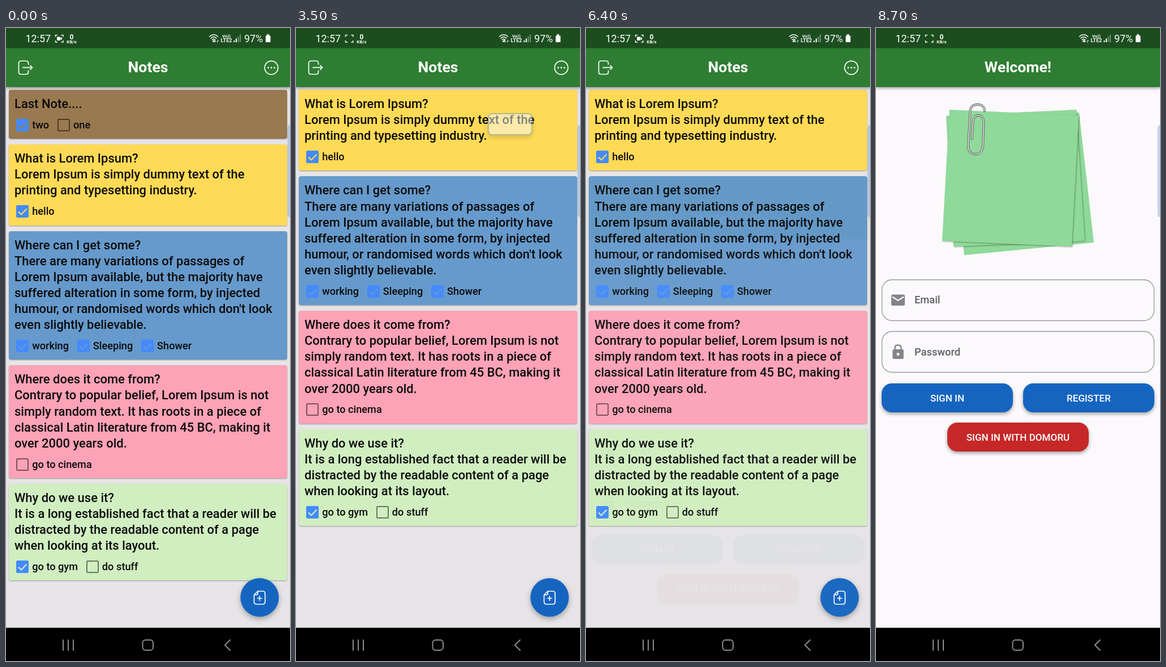
An HTML page for the animation above (8.9 s loop, 502 by 1115 pixels).

```html
<!DOCTYPE html>
<html lang="en">
<head>
<meta charset="utf-8">
<title>Notes app</title>
<style>
  html, body { margin: 0; width: 100%; height: 100%; overflow: hidden; background: #000; }
  #stage { position: relative; width: 502px; height: 1115px; overflow: hidden; }
  #stage, svg text { font-family: Roboto, Arial, sans-serif; font-weight: 500; }
  .page, svg.full { position: absolute; left: 0; top: 0; width: 502px; height: 1115px; }
  .bar {
    position: absolute; left: 0; top: 0; width: 502px; height: 104px; background: #2e7d32;
    box-shadow: 0 2px 5px rgba(0,0,0,.4); color: #fff; text-align: center;
    font-size: 26.7px; font-weight: 700; line-height: 138px;
  }
  #notes { background: #e6e4e6; }
  #login { background: #fbf9fb; }
  #list { position: absolute; left: 5px; top: 109px; width: 492px; }
  .card {
    box-sizing: border-box; margin-bottom: 10.05px; padding: 11px 0 13.3px 10px;
    border-radius: 4px; background: var(--c); color: #0b0b0b;
    font-size: 21.96px; line-height: 28.1px; white-space: nowrap;
    box-shadow: 0 1px 2px rgba(0,0,0,.35);
  }
  .card.held { border-radius: 8px; box-shadow: inset 0 0 0 1.5px #111, 0 1px 2px rgba(0,0,0,.35); }
  .chips { display: flex; height: 22px; margin: 11.8px 0 0 3px; font-size: 18.2px; line-height: 22px; }
  .chips span { margin: 0 14.6px 0 6.2px; }
  .chips i { box-sizing: border-box; width: 22px; height: 22px; border: 2px solid rgba(0,0,0,.5); border-radius: 2.5px; }
  .chips i.on { border: 0; background: #448aff; }
  .chips svg { display: block; fill: none; stroke: var(--c); stroke-width: 2.2; }
  #menu {
    position: absolute; right: 84.5px; top: 149.5px; box-sizing: border-box; overflow: hidden;
    background: #fdfcfd; border: 2px solid #5b9fdb; border-radius: 8px;
    box-shadow: 0 4px 8px rgba(0,0,0,.3);
  }
  #menu div { position: absolute; right: 0; width: 132px; height: 58.6px; overflow: hidden; }
  #menu span { position: absolute; left: 17px; font-size: 18.3px; line-height: 58.6px; color: #0b0b0b; white-space: nowrap; }
  #menu i { position: absolute; border-radius: 50%; background: rgba(185,182,186,.4); }
  .line { fill: none; stroke: #fff; stroke-width: 1.7; stroke-linecap: round; stroke-linejoin: round; }
  .line.thin { stroke-width: 1.5; }
  .line.nav { stroke: #8c8c8c; stroke-width: 2; }
  .regular text { font-weight: 400; }
  .bold text { font-weight: 700; }
  .sheet { filter: drop-shadow(1px 1px 1px rgba(0,0,0,.35)); }
</style>
</head>
<body>
<div id="stage">
  <div class="page" id="notes">
    <div id="list"></div>
    <div class="bar">Notes</div>
    <svg class="full">
      <g class="line">
        <path d="M39.500 64V62Q39.500 58 35.500 58H26.500Q22.500 58 22.500 62V77.500Q22.500 81.500 26.500 81.500H35.500Q39.500 81.500 39.500 77.500V75M30 69.700H46.500M43 66.200L46.500 69.700L43 73.200"/>
        <circle cx="469" cy="70" r="11.800"/>
      </g>
      <path d="M463.500 70h.01M469 70h.01M474.500 70h.01" stroke="#fff" stroke-width="2.900" stroke-linecap="round"/>
      <circle cx="448.300" cy="1003" r="34" fill="#1565c0" style="filter:drop-shadow(0 4px 5px rgba(0,0,0,.3))"/>
      <path class="line" d="M438.500 998.500L445 992H453.500Q458 992 458 996.500V1010.500Q458 1015 453.500 1015H443Q438.500 1015 438.500 1010.500ZM438.500 998.500H442.500Q445 998.500 445 996V992M448.300 1000.800V1008.200M444.600 1004.500H452"/>
      <g id="press" fill="#fff">
        <circle cx="34.500" cy="69" r="42.500" opacity=".2"/>
        <circle id="splash" opacity=".27"/>
      </g>
    </svg>
  </div>

  <div id="menu">
    <div style="top:8px"><span>Open note</span></div>
    <div style="top:66px"><i></i><span>Delete note</span></div>
  </div>

  <div class="page" id="login">
    <div class="bar">Welcome!</div>
    <svg class="full">
      <defs>
        <path id="clip" d="M192 146C192 131 167 131 166.500 146L163 207C162 227 188 227 189 209L190.500 167C191 150 172 150 171.500 165L169.500 195"/>
      </defs>
      <g id="paper" fill="#8fd99a">
        <path d="M132 173L359 149L385 378L156 400Z"/>
        <path class="sheet" d="M124 155L354 144L369 375L137 385Z"/>
        <path class="sheet" d="M130 144L358.500 154L346 385L117 375Z"/>
        <g fill="none" stroke-linecap="round">
          <use href="#clip" stroke="#5c615c" stroke-width="3.800"/>
          <use href="#clip" stroke="#e4e6e4" stroke-width="1.700"/>
        </g>
      </g>
      <g fill="none" stroke="#98969a" stroke-width="1.300">
        <rect x="10.500" y="443.500" width="481" height="72" rx="18"/>
        <rect x="10.500" y="534.500" width="481" height="72" rx="18"/>
      </g>
      <rect x="27" y="469.500" width="24" height="19.500" rx="2.500" fill="#858387"/>
      <path d="M29 473.500L39 480L49 473.500" fill="none" stroke="#fbf9fb" stroke-width="2.300"/>
      <rect x="29.300" y="566" width="19.500" height="17" rx="2.500" fill="#858387"/>
      <path d="M33.500 567V563.500Q33.500 558.500 39 558.500T44.500 563.500V567" fill="none" stroke="#858387" stroke-width="2.400"/>
      <circle cx="39" cy="574.500" r="2.500" fill="#fbf9fb"/>
      <g font-size="18.300" fill="#626064">
        <text x="68" y="485.300">Email</text>
        <text x="68" y="576.700">Password</text>
      </g>
      <g id="buttons" font-size="17.100" text-anchor="middle"></g>
    </svg>
  </div>

  <svg class="full">
    <rect width="502" height="35.500" fill="#000" opacity=".39"/>
    <g fill="#fff">
      <g class="regular" font-size="17.900">
        <text x="34.500" y="25">12:57</text>
        <text x="421" y="25">97%</text>
      </g>
      <g class="bold" text-anchor="middle">
        <text x="116" y="19.500" font-size="12">0</text>
        <text x="116" y="27" font-size="8">KB/s</text>
        <text x="389.500" y="16.800" font-size="8">Vo))</text>
        <text x="389.500" y="25" font-size="9">LTE2</text>
      </g>
      <path d="M459 13.500h2V11h4v2.500h2.500V25h-8.500z"/>
      <path d="M402.500 22h2v3h-2zM406 18.500h2V25h-2z"/>
      <path d="M409.500 15h2v10h-2zM413 11.500h2V25h-2z" opacity=".4"/>
      <path d="M369 26v-6l-2 2.500h4zM374 20v6l-2-2.500h4z"/>
      <circle cx="367" cy="23.300" r="1.800"/>
      <g id="rec">
        <rect x="90" y="15.500" width="6.500" height="6.500" rx="1.200"/>
        <path d="M96 18.500L99 16V21.500Z"/>
      </g>
    </g>
    <g class="line thin">
      <path d="M87.500 15V12.500H90.500M98 12.500H101V15M101 22.500V25H98M90.500 25H87.500V22.500"/>
      <path d="M359.500 15Q367 8.500 374.500 15M362 18Q367 13.500 372 18M364.300 20.700Q367 18.300 369.700 20.700"/>
    </g>
    <path d="M502 171Q497.500 171 497.500 176V328Q497.500 333 502 333Z" fill="#6b96cf" opacity=".38"/>
    <rect y="1056.500" width="502" height="58.500"/>
    <g class="line nav">
      <path d="M101 1078V1096M110 1078V1096M119 1078V1096M396 1078L387 1087L396 1096"/>
      <rect x="241.500" y="1078" width="18.500" height="18" rx="5"/>
    </g>
  </svg>
</div>

<script>
const $ = id => document.getElementById(id);
const LOOP = 8900, STEP = 100;

// colour, text lines, chips (a leading + means ticked)
const cards = [
  ['#99794f', 'Last Note....', '+two,one'],
  ['#ffda56', 'What is Lorem Ipsum?|Lorem Ipsum is simply dummy text of the|printing and typesetting industry.', '+hello'],
  ['#669acc', "Where can I get some?|There are many variations of passages of|Lorem Ipsum available, but the majority have|suffered alteration in some form, by injected|humour, or randomised words which don't look|even slightly believable.", '+working,+Sleeping,+Shower'],
  ['#fda2b7', 'Where does it come from?|Contrary to popular belief, Lorem Ipsum is not|simply random text. It has roots in a piece of|classical Latin literature from 45 BC, making it|over 2000 years old.', 'go to cinema'],
  ['#d0eec0', 'Why do we use it?|It is a long established fact that a reader will be|distracted by the readable content of a page|when looking at its layout.', '+go to gym,do stuff']
];
const tick = '<svg width="22" height="22"><path d="M4 11.500L9 16.500L18.500 6.500"/></svg>';
const chip = s => s[0] === '+'
  ? `<i class="on">${tick}</i><span>${s.slice(1)}</span>`
  : `<i></i><span>${s}</span>`;
$('list').innerHTML = cards.map(([color, text, chips]) =>
  `<div class="card" style="--c:${color}">${text.replaceAll('|', '<br>')}
   <div class="chips">${chips.split(',').map(chip).join('')}</div></div>`).join('');

const button = (x, y, w, color, label) =>
  `<rect x="${x}" y="${y}" width="${w}" height="51" rx="18" fill="${color}"
    style="filter:drop-shadow(0 3px 3px rgba(0,0,0,.35))"/>
   <text x="${x + w / 2}" y="${y + 31.5}" fill="#fff">${label}</text>`;
$('buttons').innerHTML =
  button(10, 626, 232, '#1565c0', 'SIGN IN') +
  button(260, 626, 232, '#1565c0', 'REGISTER') +
  button(126, 695, 250, '#c62828', 'SIGN IN WITH DOMORU');

const first = document.querySelector('.card');
const items = document.querySelectorAll('#menu div');
const ink = document.querySelector('#menu i');

const ramp = (t, a, b) => Math.min(1, Math.max(0, (t - a) / (b - a)));

function bezier(x, x1, y1, x2, y2) {
  const at = (s, a, b) => 3 * s * (1 - s) * ((1 - s) * a + s * b) + s ** 3;
  let lo = 0, hi = 1;
  for (let i = 0; i < 20; i++) {
    const mid = (lo + hi) / 2;
    if (at(mid, x1, x2) < x) lo = mid; else hi = mid;
  }
  return at(lo, y1, y2);
}

function drawMenu(t) {
  const p = t < 3000 ? ramp(t, 950, 1250) : ramp(1 - ramp(t, 3233, 3533), 0, 2 / 3);
  const unit = 1 / 3.5, style = $('menu').style;
  style.display = p ? 'block' : 'none';
  style.opacity = ramp(p, 0, 1 / 3);
  style.width = 136 * ramp(p, 0, unit) + 'px';
  style.height = 136 * ramp(p, 0, 2 * unit) + 'px';
  items.forEach((item, i) => {
    const start = (i + 1) * unit;
    item.style.opacity = ramp(p, start, Math.min(1, start + 1.5 * unit));
  });
  items[1].style.background = `rgba(188,186,189,${0.4 * ramp(t, 2500, 2700)})`;
  const r = 79 * Math.max(0, t - 2500) / 700;
  ink.style.cssText = `left:${95 - r}px;top:${29 - r}px;width:${2 * r}px;height:${2 * r}px`;
}

function drawPress(t) {
  const grow = ramp(t, 5400, 6300);
  $('press').setAttribute('opacity', ramp(t, 5350, 5500) * (1 - ramp(t, 6100, 6300)));
  $('splash').setAttribute('cx', 30 + 4.5 * grow);
  $('splash').setAttribute('cy', 78 - 9 * grow);
  $('splash').setAttribute('r', 42 * grow);
}

function drawLogin(t) {
  const p = ramp(t, 6362, 6662), style = $('login').style;
  style.display = p ? 'block' : 'none';
  style.opacity = p < 1 ? bezier(p, .42, 0, 1, 1) : 1;
  style.transform = `translateY(${p < 1 ? 279 * (1 - bezier(p, .4, 0, .2, 1)) : 0}px)`;
  $('paper').style.display = t < 6700 ? 'none' : '';
}

function draw(now) {
  const t = Math.floor(now % LOOP / STEP) * STEP;
  $('rec').style.display = t % 1000 < 500 ? '' : 'none';
  first.style.display = t < 3400 ? '' : 'none';
  first.classList.toggle('held', t >= 900);
  drawMenu(t);
  drawPress(t);
  drawLogin(t);
}

const begin = performance.now();
function frame() {
  draw(performance.now() - begin);
  requestAnimationFrame(frame);
}
frame();
</script>
</body>
</html>
```
